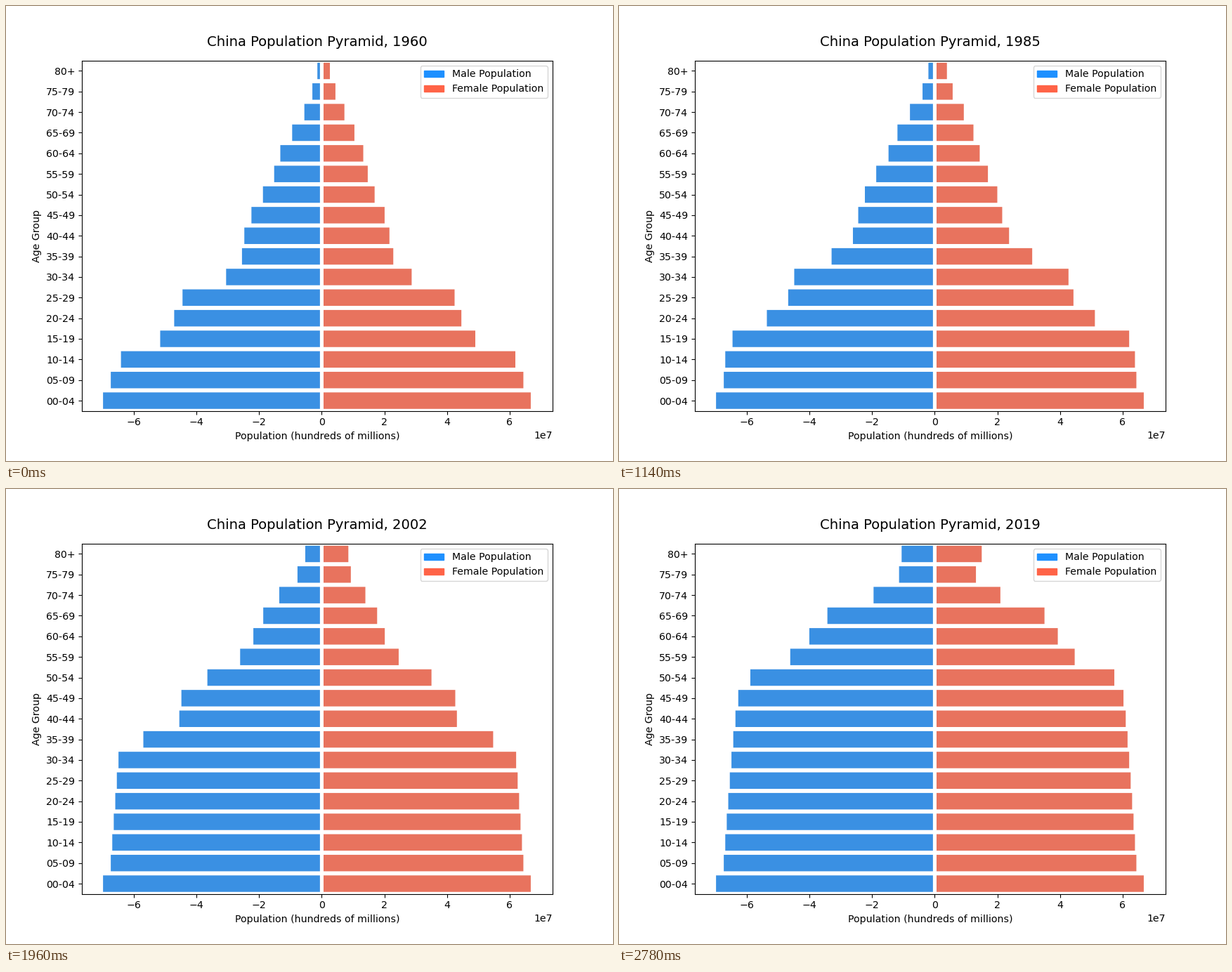
A matplotlib script for the animation above (2880 ms loop, 864 by 648 pixels).

```python
import numpy as np
import matplotlib.pyplot as plt
from matplotlib.animation import FuncAnimation
from matplotlib.patches import Patch

plt.rcParams.update({"font.family": "DejaVu Sans", "font.size": 10.125})

STEP = 20  # ms
FIRST, LAST = 1960, 2019
DATA_START = 1979  # the bars stay still until this year
AGES = [f"{a:02d}-{a + 4:02d}" for a in range(0, 80, 5)] + ["80+"]
GROUPS = np.arange(len(AGES))

# Size of a five-year birth cohort, in millions, at a few birth years
BIRTHS = [*range(1899, 1955, 5), 1957, 1962, 1964, 1969, 1972]
BOYS = [6.8, 8.6, 10.2, 13.7, 16.9, 18.1, 21.5, 25.1, 27.2, 27.7, 32.9,
        47.5, 50.0, 49.9, 54.3, 67.0, 69.9]
GIRLS = [7.0, 9.2, 11.3, 13.9, 16.2, 17.1, 19.1, 22.3, 23.7, 24.8, 30.9,
         45.3, 47.3, 47.2, 51.6, 64.6, 66.8]


def population(births, hazard, year):
    """Survivors of each birth cohort: infant, steady and old-age losses."""
    born = np.interp(year - 5 * GROUPS, BIRTHS, births)
    progress = np.exp(-0.005 * (year - 2000))
    old_age = hazard * progress * np.exp(0.65 * GROUPS)
    people = born * np.exp(-0.029 * (GROUPS > 0) - 0.007 * GROUPS - old_age)
    people[-1] *= 1.63 * np.exp(0.008 * (year - 2000))  # open-ended group
    return people * 1e6


def history(births, hazard):
    """Bars only ever grow: each year keeps the largest value so far."""
    rows = [population(births, hazard, max(year, DATA_START))
            for year in range(FIRST, LAST + 1)]
    return np.maximum.accumulate(rows)


males = history(BOYS, 4.83e-5)
females = history(GIRLS, 3.2e-5)

# Every third year, and the last one, is held for five steps
years = np.arange(FIRST, LAST + 1)
holds = np.where(((years - FIRST) % 3 == 1) | (years == LAST), 5, 1)
schedule = np.repeat(years, holds)

fig, ax = plt.subplots(figsize=(8.64, 6.48), dpi=100)
left = ax.barh(GROUPS, -males[0], height=0.8, color="#3a90e3", snap=False)
right = ax.barh(GROUPS, females[0], height=0.8, color="#e8735e", snap=False)
ax.axvline(0, color="white", lw=3.7, snap=False)

ax.set_xlim(-7.666e7, 7.368e7)
ax.set_ylim(-0.5, len(AGES) - 0.5)
ax.set_yticks(GROUPS, AGES)
ax.set_xlabel("Population (hundreds of millions)")
ax.set_ylabel("Age Group")
title = ax.set_title("", fontsize=14.175, pad=15)
ax.legend(handles=[Patch(color="dodgerblue", label="Male Population"),
                   Patch(color="tomato", label="Female Population")],
          loc="upper right")


def update(i):
    year = schedule[i]
    row = year - FIRST
    for bar, value in zip(left, males[row]):
        bar.set_width(-value)
    for bar, value in zip(right, females[row]):
        bar.set_width(value)
    title.set_text(f"China Population Pyramid, {year}")
    return [*left, *right, title]


anim = FuncAnimation(fig, update, frames=len(schedule), interval=STEP,
                     repeat=True, repeat_delay=0, blit=False)
plt.show()
```
